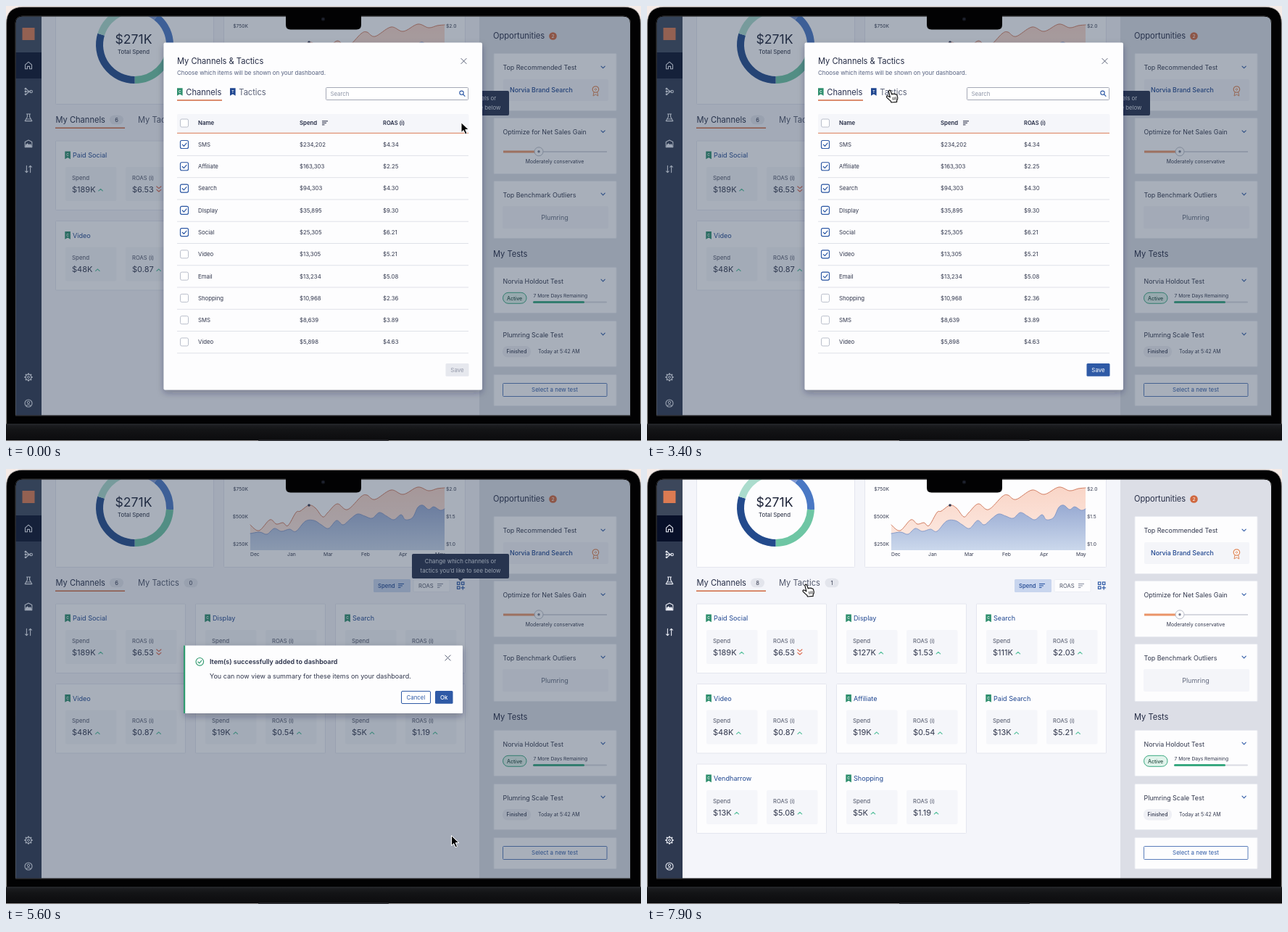
An HTML page for the animation above (8 s loop, 876 by 600 pixels).

```html
<!DOCTYPE html>
<html lang="en">
<head>
<meta charset="utf-8">
<title>Dashboard channel picker</title>
<style>
  html, body { margin: 0; width: 100%; height: 100%; overflow: hidden; background: #f5ebe7; }
  svg { display: block; width: 876px; height: 600px; }
  text { font-family: Inter, "Open Sans", sans-serif; white-space: pre; }
</style>
</head>
<body>
<svg id="stage" viewBox="0 0 876 600" xmlns="http://www.w3.org/2000/svg"></svg>
<script>
const LOOP = 8000, STEP = 100;
const INK = '#30364c', BLUE = '#2f5aa6', NAVY = '#1f4690', ORANGE = '#d0683f', GREEN = '#3aa981', MINT = '#5cc3a0';

// Click times: each one changes the interface
const T = { video: 1200, email: 2300, tactics: 3500, first: 4600, saved: 5500, closed: 6700 };

// Drawing helpers
const text = (x, y, s, size = 7.8, fill = INK, weight = 400, anchor = 'start') =>
  `<text x="${x}" y="${y}" font-size="${size}" fill="${fill}" font-weight="${weight}" text-anchor="${anchor}">${s}</text>`;
const mid = (x, y, s, size, fill, weight) => text(x, y, s, size, fill, weight, 'middle');
const box = (x, y, w, h, fill, r = 0, stroke = 'none', sw = 1) =>
  `<rect x="${x}" y="${y}" width="${w}" height="${h}" rx="${r}" fill="${fill}" stroke="${stroke}" stroke-width="${sw}"/>`;
const dot = (x, y, r, fill, stroke = 'none', sw = 1) =>
  `<circle cx="${x}" cy="${y}" r="${r}" fill="${fill}" stroke="${stroke}" stroke-width="${sw}"/>`;
const line = (d, stroke, sw = 1, fill = 'none') =>
  `<path d="${d}" stroke="${stroke}" stroke-width="${sw}" fill="${fill}" stroke-linecap="round" stroke-linejoin="round"/>`;
const rule = (x1, x2, y, stroke, sw = 1) =>
  `<path d="M${x1} ${y}H${x2}" stroke="${stroke}" stroke-width="${sw}"/>`;
const at = (x, y, body) => `<g transform="translate(${x} ${y})">${body}</g>`;
const when = (from, to, body) => `<g data-from="${from}" data-to="${to}">${body}</g>`;

const pen = document.createElement('canvas').getContext('2d');
function widthOf(s, size) {
  pen.font = `${size}px Inter, "Open Sans", sans-serif`;
  return pen.measureText(s).width;
}

const cross = (x, y, r = 3.6) =>
  line(`M${x - r} ${y - r}l${2 * r} ${2 * r}m0 ${-2 * r}l${-2 * r} ${2 * r}`, '#5a6278', 1);
const chevron = y => line(`M821 ${y - 1.2}l2.6 2.6 2.6 -2.6`, BLUE, 1.1);
const flag = (x, y, fill, letter) =>
  `<path d="M${x} ${y}h7.6v10.6l-3.8 -2.2 -3.8 2.2z" fill="${fill}"/>` + mid(x + 3.8, y + 6.4, letter, 5, '#fff', 600);
const bars = (x, y, fill) =>
  [8, 6, 3.5].map((w, i) => rule(x, x + w, y - 2.5 + i * 2.5, fill, 1.1)).join('');

function donut(cx, cy, r) {
  const point = a => `${cx + r * Math.sin(a * Math.PI / 180)} ${cy - r * Math.cos(a * Math.PI / 180)}`;
  return [[38, 93, '#4a78c4'], [93, 180, '#6ec6a4'], [180, 287, '#234a8c'], [287, 340, '#abdccd'], [340, 398, '#8299d2']]
    .map(([a, b, c]) => `<path d="M${point(a)}A${r} ${r} 0 0 1 ${point(b)}" fill="none" stroke="${c}" stroke-width="10"/>`).join('');
}

// Smooth curve through points
function curve(p) {
  return p.map(([x, y], i) => {
    if (!i) return `M${x} ${y}`;
    const [bx, by] = p[i - 1], [ax, ay] = p[i - 2] || p[i - 1], [cx, cy] = p[i + 1] || p[i];
    return `C${bx + (x - ax) / 6} ${by + (y - ay) / 6} ${x - (cx - bx) / 6} ${y - (cy - by) / 6} ${x} ${y}`;
  }).join('');
}

function chart() {
  const hot = [[337, 77], [349, 85], [364, 70], [373, 76], [382, 74], [389, 78], [400, 60], [406, 58], [418, 50],
    [427, 54], [437, 66], [444, 60], [457, 48], [471, 56], [490, 38], [498, 36], [509, 42], [531, 29], [548, 35],
    [568, 25], [583, 30], [595, 27], [605, 26]];
  const cool = [[337, 89], [350, 87], [360, 90], [370, 82], [380, 86], [391, 83], [400, 86], [413, 72], [425, 71],
    [435, 77], [445, 82], [456, 71], [465, 77], [475, 69], [485, 62], [495, 65], [505, 68], [515, 60], [525, 65],
    [535, 70], [545, 63], [551, 70], [561, 67], [568, 53], [575, 50], [583, 56], [590, 52], [599, 57], [605, 55]];
  const a = curve(hot), b = curve(cool), close = 'L605 112L337 112Z';
  const left = ['$750K', '$500K', '$250K'], right = ['$2.0', '$1.5', '$1.0'];
  const months = [['Dec', 337], ['Jan', 388], ['Mar', 438], ['Feb', 490], ['Apr', 542], ['May', 592]];
  return `<path d="${a + close}" fill="url(#hot)"/><path d="${b + close}" fill="url(#cool)"/>` +
    line(b, '#8096c6', .9) + line(a, '#d27d61', 1) + dot(418, 50, 1.8, '#30364c') +
    left.map((s, i) => text(334, 30.4 + i * 38, s, 6.7, INK, 400, 'end')).join('') +
    right.map((s, i) => text(607, 30.4 + i * 38, s, 6.7)).join('') +
    months.map(([s, x]) => text(x, 120, s, 6.8)).join('');
}

function metric(x, y, label, value, falling) {
  const end = x + 9 + widthOf(value, 11) + 7;
  const mark = falling
    ? line(`M${end - 3} ${y + 27}l3 2.6 3 -2.6m-6 4.4l3 2.6 3 -2.6`, '#dd6a4f', 1.2)
    : line(`M${end - 2.8} ${y + 33}l2.8 -2.6 2.8 2.6`, MINT, 1.1);
  return box(x, y, 70.5, 47, '#f5f6fa', 2) + text(x + 9, y + 17.6, label, label === 'Spend' ? 7.9 : 7.6, '#4a5064') +
    text(x + 9, y + 34.6, value, 11, INK) + mark;
}

function channelCard([name, spend, roas, falling], i) {
  const x = 68.5 + 193 * (i % 3), y = 186 + 110.5 * Math.floor(i / 3);
  return box(x, y, 179, 95.5, '#fdfdfe', 1, '#e4e6ef') + flag(x + 12.8, y + 14.6, '#2f8f6e', 'C') +
    text(x + 23.5, y + 23.2, name, 9.1, NAVY) +
    metric(x + 13.5, y + 36, 'Spend', spend) + metric(x + 96.5, y + 36, 'ROAS (i)', roas, falling);
}

const badge = (x, s) => box(x, 150.7, 19, 12.6, '#e3e5ec', 6.3) + mid(x + 9.5, 159.8, s, 7.6);

function dashboard() {
  const head = [['Paid Social', '$189K', '$6.53', true], ['Display', '$127K', '$1.53'], ['Search', '$111K', '$2.03'],
    ['Video', '$48K', '$0.87'], ['Affiliate', '$19K', '$0.54']];
  const shop = ['Shopping', '$5K', '$1.19'];
  const added = [['Paid Search', '$13K', '$5.21'], ['Vendharrow', '$13K', '$5.08']];
  return box(49, 14, 604, 552, '#f4f5fa') +
    box(68.5, -20, 218, 155.5, '#fdfdfe', 1, '#e4e6ef') + box(300.5, -20, 333, 155.5, '#fdfdfe', 1, '#e4e6ef') +
    donut(177.5, 53.5, 48.5) + mid(176, 52, '$271K', 17.6, '#1d2338') + mid(176, 66, 'Total Spend', 7.8, '#1d2338') + chart() +
    text(68.5, 160.6, 'My Channels', 11.1, '#252c45') + rule(68, 164, 168.2, ORANGE, 1.5) +
    text(182, 160.6, 'My Tactics', 11.1, '#51576b') +
    when(0, T.closed, badge(143, '6') + badge(245.5, '0') + [...head, shop].map(channelCard).join('')) +
    when(T.closed, LOOP, badge(143, '8') + badge(245.5, '1') + [...head, ...added, shop].map(channelCard).join('')) +
    box(507, 152, 51, 18, '#c8d5ee', 1.5) + text(513, 163.8, 'Spend', 7.7, NAVY, 500) + bars(541, 161, BLUE) +
    box(562, 152.5, 50, 17, '#fdfdfe', 1.5, '#eceef4') + text(569, 163.8, 'ROAS', 7.7, '#4a5064') + bars(595, 161, '#8d93a5') +
    [[622.5, 156], [628.5, 156], [622.5, 162]].map(([x, y]) => box(x, y, 3.4, 3.4, 'none', 0, BLUE, 1.2)).join('') +
    line('M630.2 161.4v4.8m-2.4 -2.4h4.8', BLUE, 1.2);
}

function panel() {
  const cards = [[65, 79], [154, 77], [241, 79], [360, 63], [434, 63], [508, 43]];
  const titles = [[88, 'Top Recommended Test'], [177.3, 'Optimize for Net Sales Gain'], [263.6, 'Top Benchmark Outliers'],
    [382.6, 'Norvia Holdout Test'], [456.6, 'Plumring Scale Test']];
  return box(653, 14, 209, 552, '#dcdee6') +
    text(672, 45.3, 'Opportunities', 11.1, '#252c45') + dot(754.5, 41.5, 5.3, ORANGE) + mid(754.5, 44, '2', 6.8, '#fff') +
    cards.map(([y, h]) => box(673, y + .5, 169, h, '#fdfdfe', 1, '#e9ebf1')).join('') +
    titles.map(([y, s]) => text(685.5, y, s, 8.9, INK)).join('') +
    [84.3, 173, 259.4, 378.4, 452.4].map(chevron).join('') +
    box(686, 101, 145, 30, '#f4f5f9', 2) + text(695, 119.2, 'Norvia Brand Search', 8.8, NAVY, 500) +
    line('M811 119l-1 5 3.4 -2 3.4 2 -1 -5', '#e08a5c', 1) + dot(813.4, 115, 4.2, '#fdfdfe', '#e08a5c', 1.3) +
    dot(813.4, 115, 1.3, 'none', '#e08a5c', .9) +
    rule(686, 829, 201, '#d6d8e0', 2) + rule(686, 735, 201, '#ea9468', 3) +
    dot(735, 200.8, 6, '#fdfdfe', '#b9bdc9', 1) + dot(735, 200.8, 1.7, '#777e90') +
    mid(757, 217, 'Moderately conservative', 6.9) +
    box(685, 276, 146, 31, '#f4f5f9', 2) + mid(757, 295.3, 'Plumring', 9, '#636a7e') +
    text(672, 346, 'My Tests', 11.1, '#252c45') +
    box(685.5, 395.3, 32.5, 15, '#e0f3eb', 7.5, GREEN, 1) + mid(701.6, 405.6, 'Active', 7, '#20463c', 500) +
    text(727.5, 402.4, '7 More Days Remaining', 6.7) + box(727, 407.4, 102, 2, '#d9dbe3', 1) + box(727, 407, 71, 3, GREEN, 1.5) +
    box(685, 469, 39, 15.5, '#eff0f5', 7) + mid(704.5, 479.3, 'Finished', 6.9, INK, 500) + text(734, 479.3, 'Today at 5:42 AM', 6.9) +
    box(685.5, 520.5, 143.5, 18, '#fdfdfe', 1, '#5a7dbb') + mid(757, 532.3, 'Select a new test', 7.9, BLUE);
}

function sidebar() {
  const w = '#e9ecf4', s = (d) => line(d, w, 1.1);
  const teeth = [...Array(8)].map((_, i) => `<path d="M0 -5.6V-4" transform="rotate(${i * 45})" stroke="${w}" stroke-width="2"/>`).join('');
  return box(13, 14, 36, 552, '#2e3950') + box(13, 14, 36, 50, '#3c475b') + box(13, 64, 36, 36, '#081029') +
    box(22.5, 30, 17, 17, '#dc7b52') +
    at(31, 82, s('M-4.5 -.8L0 -4.8 4.5 -.8V4.8H1.6V1.4H-1.6V4.8H-4.5Z')) +
    at(31, 118, s('M-3 -3.6L1 0H-3M-3 3.6L1 0H3') + dot(-4, -3.8, 1.4, w) + dot(-4, 0, 1.4, w) + dot(-4, 3.8, 1.4, w) + dot(3.6, 0, 1.8, 'none', w, 1.1)) +
    at(31, 154, s('M-2.6 -5H2.6M-1.6 -5V-1L-4.8 4.6H4.8L1.6 -1V-5M-3 2H3')) +
    at(31, 190, s('M-4.8 -2.4L0 -5 4.8 -2.4V4.6H-4.8Z') + `<path d="M-4 4V1.6L-1.4 -.8 .8 1.2 2.2 0 4 1.8V4Z" fill="${w}"/>`) +
    at(31, 225, s('M-2.6 -4.6V4.6M-4.4 2.8L-2.6 4.6 -.8 2.8M2.6 4.6V-4.6M.8 -2.8L2.6 -4.6 4.4 -2.8')) +
    at(31, 512, teeth + dot(0, 0, 3.9, 'none', w, 1.1) + dot(0, 0, 1.5, 'none', w, 1)) +
    at(31, 548, dot(0, 0, 5, 'none', w, 1.1) + dot(0, -1.2, 1.7, 'none', w, 1) + s('M-3.2 3.4Q0 .6 3.2 3.4'));
}

const tooltip = () => box(560, 117, 134, 34, '#26314c', 2) + '<path d="M623.5 151h7l-3.5 3.5z" fill="#26314c"/>' +
  mid(627, 130.4, 'Change which channels or', 7.85, '#e4e7ef') + mid(627, 142.6, 'tactics you’d like to see below', 7.85, '#e4e7ef');

function check(y, from = Infinity) {
  const x = 240.5;
  return box(x, y - 5.5, 11, 11, '#fff', 2, '#b3b8c6', .9) + (from < LOOP
    ? when(from, LOOP, box(x, y - 5.5, 11, 11, '#fff', 2, BLUE, 1.2) + line(`M${x + 2.8} ${y + .2}l2.1 2.1 3.6 -4.2`, BLUE, 1.2)) : '');
}

function channelRows() {
  const rows = [['SMS', '234,202', '4.34'], ['Affiliate', '163,303', '2.25'], ['Search', '94,303', '4.30'],
    ['DIsplay', '35,895', '9.30'], ['Social', '25,305', '6.21'], ['Video', '13,305', '5.21'], ['Email', '13,234', '5.08'],
    ['Shopping', '10,968', '2.36'], ['SMS', '8,639', '3.89'], ['Video', '5,898', '4.63']];
  const checked = [0, 0, 0, 0, 0, T.video, T.email];
  return rows.map(([name, spend, roas], i) => {
    const y = 191 + 30.27 * i;
    return check(y, checked[i]) + text(265, y + 2.9, name) + text(405, y + 2.9, '$' + spend, 7.8) +
      text(520, y + 2.9, '$' + roas, 7.8) + rule(236, 638, y + 15.4, '#dfe1e8');
  }).join('');
}

function tacticRows() {
  const rows = [['Hearkling SMS', 'SMS', '24,202', '4.34'], ['Ovel - Affiliate', 'Affiliate', '21,639', '4.34'],
    ['Zond Search - Brand', 'Search', '20,304', '1.34'], ['Tamiro - Prospecting', 'Display', '19,458', '1.34'],
    ['Tamiro - Retargeting', 'Display', '18,639', '1.34'], ['Plumring - Gainfully Baskets', 'Social', '17,304', '0.34'],
    ['Plumring - Prospecting', 'Social', '15,304', '8.34'], ['Plumring - Retargeting', 'Social', '14,485', '7.87'],
    ['Plumring - Retention', 'Social', '13,485', '0.45']];
  return '<g clip-path="url(#list)">' + rows.map(([name, kind, spend, roas], i) => {
    const y = 194 + 35.87 * i;
    return check(y, i ? Infinity : T.first) + text(265, y - 4.4, name, 7.8, INK, 600) + text(265, y + 10.2, kind) +
      text(405, y + 2.9, '$' + spend, 7.8) + text(520, y + 2.9, '$' + roas, 7.8) + rule(236, 638, y + 17.6, '#dfe1e8');
  }).join('') + '</g>';
}

function picker() {
  const tab = (x, label, on) => text(x, 122.6, label, 11.1, on ? '#2a3150' : '#596077');
  const tabs = second => tab(248.3, 'Channels', !second) + tab(321.3, 'Tactics', second) +
    (second ? rule(309, 359.5, 130, ORANGE, 1.5) : rule(236, 298, 130, ORANGE, 1.5));
  return `<g filter="url(#shade)">${box(217.5, 50.5, 439.5, 479, '#fdfdfe', 2)}</g>` +
    text(236, 80, 'My Channels &amp; Tactics', 11.1, '#252c45') + cross(631.5, 76) +
    text(236, 94.8, 'Choose which items will be shown on your dashboard.', 7.97, '#55607f') +
    flag(236, 113.2, '#2f8f6e', 'C') + flag(309, 113.2, NAVY, 'T') +
    box(441.5, 112.5, 196, 17, '#fff', 1, '#9a9fae', .9) + text(447.5, 123.6, 'Search', 7.8, '#8d94a6') +
    dot(628.5, 119.8, 2.7, 'none', BLUE, 1.1) + line('M630.6 121.9l2.4 2.4', BLUE, 1.2) +
    box(236, 149, 402.5, 26, '#f5f6fa', 2) + rule(236, 638, 175.4, '#e09375', 1.4) + check(161.5) +
    text(265, 164.4, 'Name', 7.8, '#252c45', 600) + text(405, 164.4, 'Spend', 7.8, '#252c45', 600) + bars(436, 161.3, INK) +
    text(520, 164.4, 'ROAS (i)', 7.5, '#252c45', 600) +
    when(0, T.tactics, tabs(false) + channelRows()) + when(T.tactics, LOOP, tabs(true) + tacticRows()) +
    when(0, T.video, box(606.5, 493, 32, 17.8, '#e6e8ee', 1.5) + mid(622.5, 504.8, 'Save', 7.9, '#9297a8')) +
    when(T.video, LOOP, box(606.5, 493, 32, 17.8, BLUE, 1.5) + mid(622.5, 504.8, 'Save', 7.9, '#fff'));
}

const dialog = () => `<g filter="url(#shade)">${box(246, 243.5, 384, 93.5, '#fdfdfe', 1)}</g>` + box(245, 243.5, 2.2, 93.5, '#2f9a6f') +
  dot(267.3, 265.8, 5.3, 'none', '#2f9a6f', 1.1) + line('M264.9 266l1.8 1.8 3.1 -3.6', '#2f9a6f', 1.1) +
  text(281, 268.8, 'Item(s) successfully added to dashboard', 8.95, '#252c45', 600) +
  text(281, 289.2, 'You can now view a summary for these items on your dashboard.', 9) + cross(609.5, 260.5) +
  box(545.5, 306.5, 40, 17, '#fff', 1.5, BLUE) + mid(565.4, 317.5, 'Cancel', 7.9, BLUE) +
  box(592, 306, 24.5, 17.8, BLUE, 1.5) + mid(604.2, 317.5, 'Ok', 7.9, '#fff', 500);

const laptop = () =>
  '<path fill-rule="evenodd" fill="#020203" stroke="#8a8888" stroke-width=".8" d="M.6 600V24Q.6 1.4 23 1.4H853Q875.4 1.4 875.4 24V600Z' +
  'M13 565H861.5V24Q861.5 14 851 14H23Q13 14 13 24Z"/>' +
  line('M13 565H861.5V24Q861.5 14 851 14H23Q13 14 13 24Z', '#020203', .9) +
  '<path d="M386 13H490V26Q490 32.5 483.5 32.5H392.5Q386 32.5 386 26Z" fill="#020203"/>' +
  dot(437.5, 18, 2.6, '#15171f') + dot(437.5, 18, 1.1, '#262b3c') +
  box(0, 576.5, 876, 24, 'url(#base)') + rule(0, 876, 577, '#34353a', .8) +
  rule(0, 876, 599.6, '#cfcac8', .8) + box(348, 598.6, 180, 3, '#3a3b40', 1.4);

const arrow = line('M0 0V13.4L3.2 10.5 5.5 15.8 8 14.7 5.7 9.6H10Z', '#fff', 1, '#000');
const hand = line('M-1.7 1.4Q-.6 -.8 .9 .8L2.8 6Q4 4.6 5.2 5.6 6.6 4.6 7.6 6 9.4 5.4 10 7.2L10.8 10.6Q10.9 12.6 9.6 14.2V16.4L2 17 1.4 15.2Q-1 13.6 -4.2 10.2 -5.2 8.2 -3.4 7.8 -2 8 .4 9.8Z', '#111', 1.2, '#fff') +
  line('M4 10.4l.6 3.2M6.1 10l.6 3.2M8.2 9.6l.5 3.2', '#111', .8);

document.getElementById('stage').innerHTML = `<defs>
  <linearGradient id="hot" x2="0" y2="1"><stop stop-color="#f9d5c7"/><stop offset="1" stop-color="#fdece5"/></linearGradient>
  <linearGradient id="cool" x2="0" y2="1"><stop stop-color="#98aad2"/><stop offset="1" stop-color="#cbd8ec"/></linearGradient>
  <linearGradient id="base" x2="0" y2="1"><stop stop-color="#1e1f22"/><stop offset=".35" stop-color="#131416"/><stop offset="1" stop-color="#0b0b0d"/></linearGradient>
  <filter id="shade" x="-10%" y="-10%" width="120%" height="130%"><feDropShadow dx="0" dy="4" stdDeviation="5" flood-color="#1b2440" flood-opacity=".32"/></filter>
  <clipPath id="list"><rect x="236" y="176" width="403" height="304"/></clipPath>
  <clipPath id="screen"><rect x="13" y="14" width="849" height="551"/></clipPath></defs>
  <g clip-path="url(#screen)">${dashboard() + panel() + sidebar()}
  ${when(0, T.closed, tooltip() + box(13, 14, 849, 552, 'rgba(42,58,84,.4)'))}
  ${when(0, T.saved, picker())}${when(T.saved, T.closed, dialog())}</g>
  ${laptop()}<g id="cursor"><g id="arrow">${arrow}</g><g id="hand">${hand}</g></g>`;

// Pointer trips: departure, arrival, click, place
const origin = [628, 161];
const trips = [
  [300, 900, T.video, [244, 341]],
  [1500, 1900, T.email, [246.5, 371]],
  [2600, 3200, T.tactics, [335, 116]],
  [3700, 4300, T.first, [248, 194]],
  [4800, 5300, T.saved, [614.5, 506]],
  [5900, 6400, T.closed, [601, 318]],
  [7000, 7700, LOOP, [219.5, 159]]
];
const ease = k => k * k * (3 - 2 * k);
const timed = [...document.querySelectorAll('[data-from]')];
const [cursor, arrowArt, handArt] = ['cursor', 'arrow', 'hand'].map(id => document.getElementById(id));
const show = (el, on) => el.setAttribute('display', on ? 'inline' : 'none');

function draw(t) {
  for (const el of timed) show(el, t >= +el.dataset.from && t < +el.dataset.to);
  let [x, y] = origin, pointing = false;
  for (const [leave, arrive, click, [tx, ty]] of trips) {
    if (t < leave) break;
    const k = ease(Math.min(1, (t - leave) / (arrive - leave)));
    x += (tx - x) * k;
    y += (ty - y) * k;
    // The hand shows over a target until it is clicked
    pointing = t < click && Math.hypot(tx - x, ty - y) < 8;
  }
  cursor.setAttribute('transform', `translate(${x} ${y})`);
  show(handArt, pointing);
  show(arrowArt, !pointing);
}

const start = performance.now();
function tick() {
  const t = (performance.now() - start) % LOOP;
  draw(Math.floor(t / STEP) * STEP);
  requestAnimationFrame(tick);
}
tick();
</script>
</body>
</html>
```
